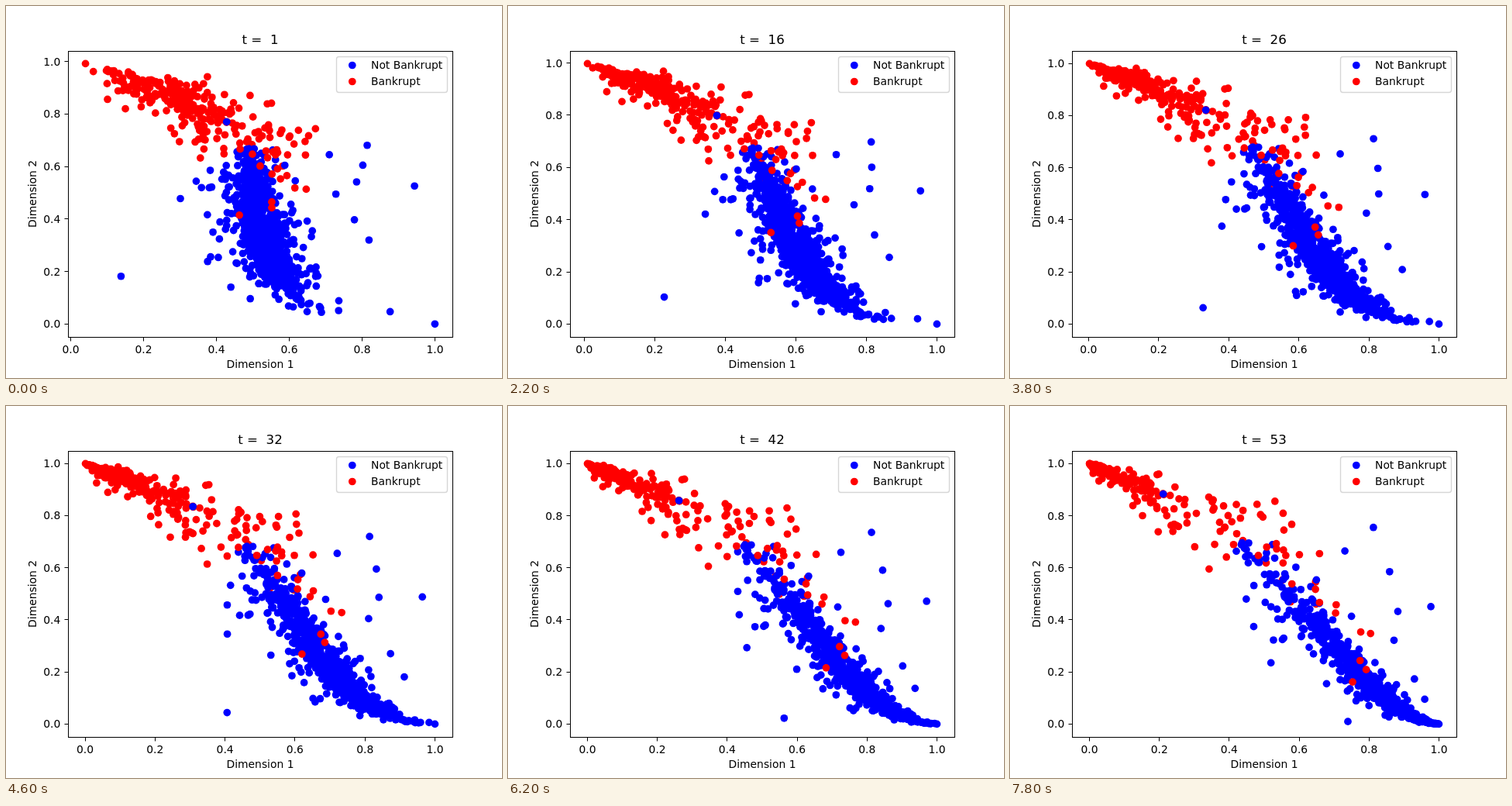
Animation, 640 px wide and 480 px high, one loop 8000 ms. Source, as an HTML page with a canvas:

```html
<!DOCTYPE html>
<html lang="en">
<head>
<meta charset="utf-8">
<title>Bankruptcy scatter</title>
<style>
  html, body { margin: 0; width: 100%; height: 100%; overflow: hidden; background: #fff; }
  canvas { display: block; }
</style>
</head>
<body>
<canvas id="stage" width="640" height="480"></canvas>
<script>
const ctx = document.getElementById('stage').getContext('2d');
const STEP_MS = 200, STEPS = 40, LAST_T = 53;
// The data extent fills this box; the axes add a 5% margin around it.
const DATA = { left: 102.55, top: 74.4, right: 553.45, bottom: 410.4 };
const RED = '#f00', BLUE = '#00f';

const logit = p => Math.log(p / (1 - p));
const sigmoid = z => 1 / (1 + Math.exp(-z));

let seed = 12;
function random() {
  seed = (seed + 0x6D2B79F5) | 0;
  let r = Math.imul(seed ^ (seed >>> 15), 1 | seed);
  r = (r + Math.imul(r ^ (r >>> 7), 61 | r)) ^ r;
  return ((r ^ (r >>> 14)) >>> 0) / 4294967296;
}
const gauss = () => (random() + random() + random() + random() - 2) * Math.sqrt(3);
const heavyGauss = () => gauss() * (random() < 0.17 ? 2.3 : 1);

// Each point drifts along a straight line in logit space.
function point(a, b, color) {
  const high = Math.max(0, b), bend = Math.tanh(b);
  return {
    a, b, color,
    va: 0.85 - 1.2 * b - 0.3 * high + a * (0.06 + 0.2 * bend),
    vb: -0.85 + 1.25 * b + 0.15 * high + a * (0.15 - 0.07 * bend)
  };
}

const cloud = (count, color, pickB, pickA) => Array.from({ length: count }, () => {
  const b = pickB();
  return point(pickA(b), b, color);
});

const strays = (pairs, color) => pairs.map(([x, y]) => point(logit(x), logit(y), color));

// Blue heights end sharply at the top and thin out toward the bottom.
function blueHeight() {
  const b = 0.85 - 1.45 * (random() + random());
  return random() < 0.06 ? b - 2 * random() : b;
}

const points = [
  ...cloud(235, RED, () => 1.85 + 0.63 * gauss(),
    b => 0.2 - 0.52 * b - 0.035 * b * b + 0.25 * heavyGauss()),
  ...cloud(1000, BLUE, blueHeight,
    b => 0.02 - 0.12 * b + 0.035 * b * b + 0.105 * heavyGauss()),
  ...cloud(18, BLUE, () => -0.8 + 0.8 * gauss(), () => 0.15 + 0.5 * gauss()),
  ...cloud(34, RED, () => 0.75 + 0.45 * gauss(), () => 0.2 + 0.28 * gauss()),
  ...strays([[0.138, 0.182], [0.301, 0.478], [0.359, 0.52], [0.428, 0.77], [0.384, 0.256],
    [0.71, 0.645], [0.728, 0.495], [0.802, 0.605], [0.814, 0.681], [0.819, 0.32],
    [0.944, 0.526], [0.877, 0.047], [0.9999, 0.0003]], BLUE),
  ...strays([[0.0404, 0.992], [0.15, 0.82], [0.463, 0.415], [0.552, 0.465],
    [0.552, 0.443], [0.672, 0.744]], RED)
];

function dot(x, y, color) {
  ctx.fillStyle = color;
  ctx.beginPath();
  ctx.arc(x, y, 4.86, 0, 2 * Math.PI);
  ctx.fill();
}

function text(string, x, y, align = 'center', size = 13.89) {
  ctx.font = `${size}px "DejaVu Sans", sans-serif`;
  ctx.textAlign = align;
  ctx.fillStyle = '#000';
  ctx.fillText(string, x, Math.round(y));
}

function line(x1, y1, x2, y2) {
  ctx.beginPath();
  ctx.moveTo(x1, y1);
  ctx.lineTo(x2, y2);
  ctx.stroke();
}

function drawAxes(toX, toY) {
  ctx.strokeStyle = '#000';
  ctx.lineWidth = 1;
  for (let i = 0; i <= 5; i++) {
    const value = i / 5, x = toX(value), y = toY(value), label = value.toFixed(1);
    const px = Math.floor(x) + 0.5, py = Math.floor(y) + 0.5;
    line(px, 428, px, 432.5);
    line(75.5, py, 80, py);
    text(label, x, 448);
    text(label, 70.3, y + 5, 'right');
  }
  ctx.strokeRect(80.5, 58.5, 496, 369);
  text('Dimension 1', 328, 467);
  ctx.save();
  ctx.translate(39, 242.4);
  ctx.rotate(-Math.PI / 2);
  text('Dimension 2', 0, 0);
  ctx.restore();
}

function drawLegend() {
  ctx.beginPath();
  ctx.roundRect(426.5, 65.5, 143, 46, 3);
  ctx.fillStyle = 'rgba(255,255,255,.8)';
  ctx.fill();
  ctx.strokeStyle = 'rgba(204,204,204,.8)';
  ctx.lineWidth = 1.39;
  ctx.stroke();
  dot(446.8, 76.5, BLUE);
  dot(446.8, 97.5, RED);
  text('Not Bankrupt', 471, 81, 'left');
  text('Bankrupt', 471, 102, 'left');
}

function draw(t) {
  const u = (t - 1) / (LAST_T - 1);
  const progress = 0.62 * u + 0.38 * u * u;
  const placed = points.map(p => ({
    x: sigmoid(p.a + p.va * progress),
    y: sigmoid(p.b + p.vb * progress),
    color: p.color
  }));
  const minX = Math.min(...placed.map(p => p.x));
  const maxY = Math.max(...placed.map(p => p.y));
  const toX = x => DATA.right - (1 - x) * (DATA.right - DATA.left) / (1 - minX);
  const toY = y => DATA.bottom - y * (DATA.bottom - DATA.top) / maxY;

  ctx.fillStyle = '#fff';
  ctx.fillRect(0, 0, 640, 480);
  for (const p of placed) dot(toX(p.x), toY(p.y), p.color);
  drawAxes(toX, toY);
  drawLegend();
  text(`t =  ${t}`, 328, 49, 'center', 16.67);
}

let shown = 0;
function tick() {
  const step = Math.floor(performance.now() / STEP_MS) % STEPS;
  const t = Math.round(1 + step * (LAST_T - 1) / (STEPS - 1));
  if (t !== shown) draw(shown = t);
  requestAnimationFrame(tick);
}
tick();
</script>
</body>
</html>
```
